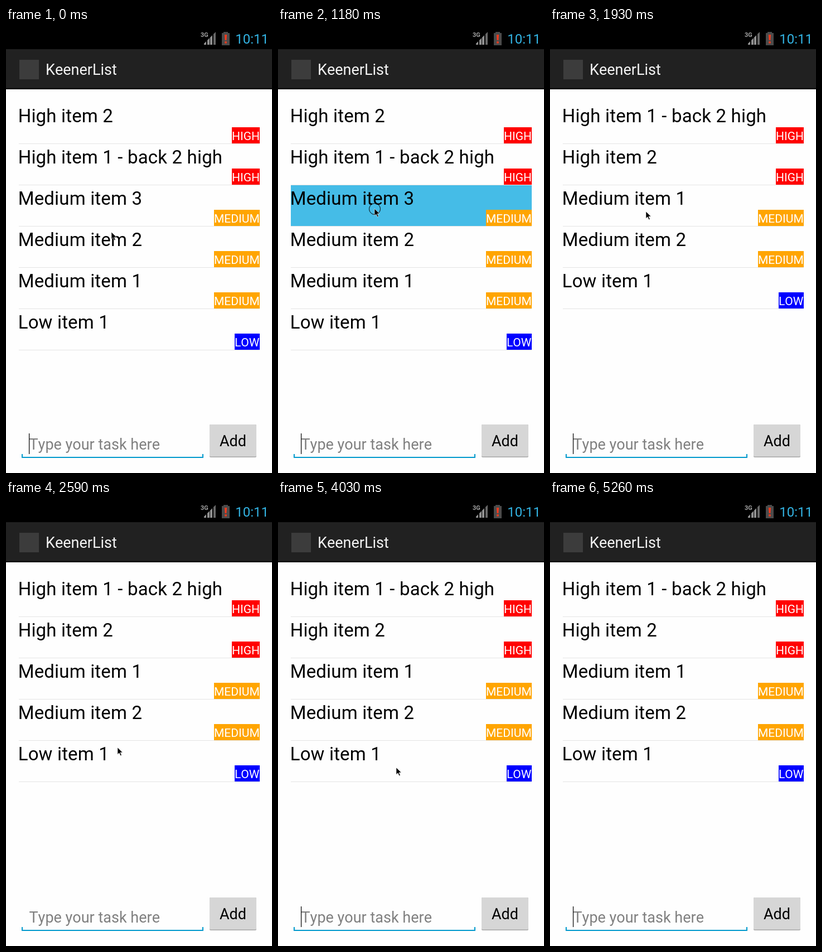
Recreate the animation shown at these times as an HTML page. Size 477 by 798 pixels, loop 5560 ms.

```html
<!DOCTYPE html>
<html lang="en">
<head>
<meta charset="utf-8">
<title>Task list</title>
<style>
  html, body { margin: 0; width: 100%; height: 100%; overflow: hidden; background: #fefefe; }
  svg { display: block; font-family: Roboto, sans-serif; font-kerning: none; }
  .task { font-size: 33px; letter-spacing: .17px; }
  .tag { font-size: 21px; fill: #fff; }
  .ui { font-size: 27px; }
</style>
</head>
<body>
<svg width="477" height="798" viewBox="0 0 477 798">
  <rect width="477" height="798" fill="#fefefe"/>

  <!-- status bar -->
  <rect width="477" height="38" fill="#000"/>
  <text x="349" y="16" font-size="11" font-weight="700" fill="#a0a0a0">3G</text>
  <path d="M355 30v-2l4-4v6zM361 30v-8l4-4v12zM366 30v-13l4-4v17z" fill="#909090"/>
  <path d="M372 30v-19l4-4v23z" fill="#686868"/>
  <path d="M390 7h8v2h3v22h-14v-22h3z" fill="#4b4b4b"/>
  <path d="M392 12h4l-.7 10h-2.600zM392.300 24h3.400v3.400h-3.400z" fill="#ff3a1c"/>
  <text x="411.300" y="28" font-size="24" fill="#33b5e5">10:11</text>

  <!-- action bar -->
  <rect y="38" width="477" height="72" fill="#212121"/>
  <rect y="107" width="477" height="3" fill="#141414"/>
  <rect x="24" y="57" width="35" height="35" fill="#3c3c3c"/>
  <text class="ui" x="71" y="84" fill="#f3f3f3">KeenerList</text>

  <rect id="glow" x="23" y="281" width="432" height="74"/>
  <g id="before"></g>
  <g id="after"></g>

  <!-- entry field and button -->
  <text class="ui" x="41.500" y="756" fill="#808080">Type your task here</text>
  <path d="M29 764v6h324v-6" fill="none" stroke="#0099cc" stroke-width="2"/>
  <rect id="caret" x="41" y="727" width="1.200" height="37"/>
  <rect x="365" y="711" width="84" height="59" rx="2" fill="#a9a9a9"/>
  <rect x="365" y="711" width="84" height="57.500" rx="2" fill="#d6d6d6"/>
  <text class="ui" x="407" y="750" text-anchor="middle">Add</text>

  <circle id="ring" cx="173.500" cy="324.500" r="10" fill="none" stroke="#000"/>
  <path id="pointer" d="M0 0v12.500l3-2.700 2.300 5 2-1-2.300-4.800h4.200z" stroke="#fff" stroke-width=".6"/>
</svg>
<script>
const LOOP = 5560;
const REMOVE_AT = 1290;
const $ = id => document.getElementById(id);
const show = (id, on) => { $(id).style.display = on ? '' : 'none'; };
const clamp = v => Math.min(1, Math.max(0, v));

const TAGS = {
  HIGH: { color: '#ff0000', width: 50 },
  MEDIUM: { color: '#ffa500', width: 82 },
  LOW: { color: '#0000ff', width: 45 }
};

function fillList(id, names) {
  $(id).innerHTML = names.map((name, i) => {
    const tag = name.split(' ')[0].toUpperCase();
    const { color, width } = TAGS[tag];
    const y = 134 + 74 * i, x = 455 - width;
    return `<text class="task" x="21.7" y="${y + 35}">${name}</text>
      <rect x="23" y="${y + 73}" width="432" height="1" fill="#e4e4e4"/>
      <rect x="${x}" y="${y + 44}" width="${width}" height="29" fill="${color}"/>
      <text class="tag" x="${x}" y="${y + 67}">${tag}</text>`;
  }).join('');
}

fillList('before', ['High item 2', 'High item 1 - back 2 high', 'Medium item 3',
  'Medium item 2', 'Medium item 1', 'Low item 1']);
fillList('after', ['High item 1 - back 2 high', 'High item 2', 'Medium item 1',
  'Medium item 2', 'Low item 1']);

// One pointer sweep: a quadratic curve, bent towards "via" when given
function sweep(start, end, from, to, { via, power = 1, leaves = false } = {}) {
  const mid = via || from.map((v, i) => (v + to[i]) / 2);
  const at = t => {
    const s = clamp((t - start) / (end - start)) ** power, r = 1 - s;
    return from.map((v, i) => Math.round(r * r * v + 2 * r * s * mid[i] + s * s * to[i]));
  };
  return { start, at, gone: t => leaves && t >= end };
}

const press = [173, 324], rest = [172, 329], low = [398, 725], left = [115, 255], turn = [178, 453];
const SWEEPS = [
  sweep(20, 90, [189, 366], press),
  sweep(1880, 1930, press, rest),
  sweep(2390, 2920, rest, low, { via: [195, 530], power: 1.3 }),
  sweep(2920, 3130, low, [422, 798], { leaves: true }),
  sweep(3740, 4290, [407, 779], left, { via: [180, 470] }),
  sweep(4320, 4660, left, turn, { via: [187, 242], power: 1.2 }),
  sweep(4850, 4910, turn, [376, 634], { leaves: true })
];

function drawPointer(t) {
  const current = SWEEPS.filter(s => s.start <= t).pop() || SWEEPS[0];
  show('pointer', !current.gone(t));
  $('pointer').setAttribute('transform', `translate(${current.at(t)})`);
}

// Steady blinking that rests while the pointer is idle at the end
function caretOn(t) {
  const beat = Math.floor((t - 418) / 484);
  return t < 418 || t >= 5260 || (t < 4300 && beat % 2 === 1);
}

// The held row deepens in small steps until it is removed
function drawGlow(t) {
  const k = clamp(Math.floor((t - 750) / 54) / 9);
  const mix = (a, b) => Math.round(a + (b - a) * k);
  show('glow', t >= 750 && t < REMOVE_AT);
  $('glow').setAttribute('fill', `rgb(${mix(132, 51)},${mix(211, 181)},${mix(239, 229)})`);
}

function draw(t) {
  show('before', t < REMOVE_AT);
  show('after', t >= REMOVE_AT);
  show('caret', caretOn(t));
  show('ring', t >= 540 && t < 1510);
  drawGlow(t);
  drawPointer(t);
}

const start = performance.now();
function tick() {
  draw((performance.now() - start) % LOOP);
  requestAnimationFrame(tick);
}
tick();
</script>
</body>
</html>
```
